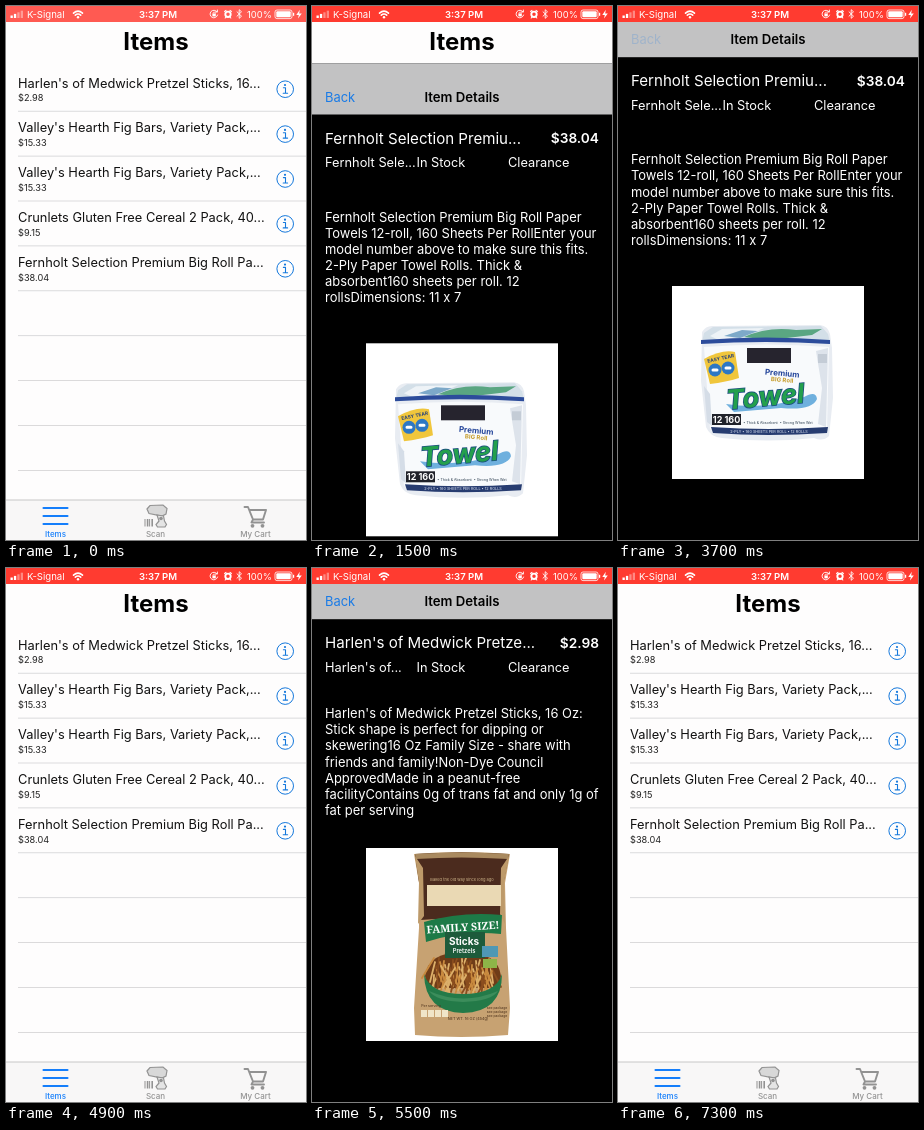
These frames come from a looping animation (300x534 px, 8 s). An HTML page:

```html
<!DOCTYPE html>
<html lang="en">
<head>
<meta charset="utf-8">
<title>Store items</title>
<style>
  html, body { margin: 0; width: 100%; height: 100%; overflow: hidden; background: #fefdfd; }
  svg { display: block; width: 100%; height: 100%; }
  text { font-family: Inter, "Liberation Sans", sans-serif; white-space: pre; }
  .line { fill: none; stroke-linecap: round; stroke-linejoin: round; }
</style>
</head>
<body>
<svg id="stage" viewBox="0 0 300 534"></svg>
<script>
const STEP = 100, LOOP = 8000, HEIGHT = 534;
const stage = document.getElementById('stage');

const text = (x, y, size, str, attrs = '') =>
  `<text x="${x}" y="${y}" font-size="${size}" ${attrs}>${str}</text>`;
const rect = (x, y, w, h, fill, attrs = '') =>
  `<rect x="${x}" y="${y}" width="${w}" height="${h}" fill="${fill}" ${attrs}/>`;
const path = (d, fill, attrs = '') => `<path d="${d}" fill="${fill}" ${attrs}/>`;
const line = (d, color, width = 1) =>
  `<path class="line" d="${d}" stroke="${color}" stroke-width="${width}"/>`;
const times = (n, make) => Array.from({ length: n }, (_, i) => make(i)).join('');
const MID = 'text-anchor="middle"';

// List screen
const items = [
  ["Harlen's of Medwick Pretzel Sticks, 16...", '$2.98'],
  ["Valley's Hearth Fig Bars, Variety Pack,...", '$15.33'],
  ["Valley's Hearth Fig Bars, Variety Pack,...", '$15.33'],
  ['Crunlets Gluten Free Cereal 2 Pack, 40...', '$9.15'],
  ['Fernholt Selection Premium Big Roll Pa...', '$38.04'],
];

const row = ([name, price], i) => `<g transform="translate(0 ${i * 44.9})">
  ${text(12, 81.5, 12.85, name, 'fill="#111"')}
  ${text(12, 95.3, 9.2, price, 'fill="#222"')}
  <circle cx="279.2" cy="83.2" r="8.3" fill="none" stroke="#1478dc"/>
  <circle cx="279" cy="79" r="1.1" fill="#1478dc"/>
  ${line('M277.4 81.8H279.5V87.2M277.2 87.2H281.6', '#1478dc', 1.1)}</g>`;

const gray = '#929292';
const tabs = rect(0, 494, 300, 40, '#f8f7f7') + rect(0, 493.6, 300, .8, '#b8b8ba') +
  line('M37.5 502H61.5M37.5 510H61.5M37.5 518H61.5', '#147efb', 2.1) +
  // barcode and hand scanner
  times(4, i => rect(138.5 + i * 2.3, 513, i % 2 ? 1.6 : 1, 7.5, gray)) +
  path('M141 503L144 499.5L157 499L161 502.5L160 508L156 510L143 507.5Z', '#d8d8d8',
    `stroke="${gray}" stroke-width="1.2"`) +
  path('M151 509L157.5 510L158.5 515L160.5 518.5L159 521H151.5L150 518.5L153 515Z', '#e4e4e4',
    `stroke="${gray}" stroke-width="1.2"`) +
  `<circle cx="155" cy="512.5" r="1.8" fill="${gray}"/>` +
  // cart
  line('M238.5 501H242L247 513.5H257L260 504H243.5M247 513.5L245.5 516.5H258', gray, 1.9) +
  `<circle cx="246.5" cy="519.8" r="1.9" fill="${gray}"/><circle cx="256.5" cy="519.8" r="1.9" fill="${gray}"/>` +
  text(49.5, 531, 8, 'Items', `${MID} fill="#147efb" font-weight="500"`) +
  text(149.5, 531, 8, 'Scan', `${MID} fill="${gray}" font-weight="500"`) +
  text(249.5, 531, 8, 'My Cart', `${MID} fill="${gray}" font-weight="500"`);

const list = rect(0, 0, 300, HEIGHT, '#fefdfd') +
  text(150, 44, 24, 'Items', `${MID} font-weight="700"`) +
  items.map(row).join('') +
  times(9, i => rect(12, 104.8 + i * 44.9, 288, .8, '#d2d2d4')) + tabs;

// Product pictures
const towels =
  path('M84 326Q88 319 96 320L202 319Q210 320 212 328L214 342L215 392L211 430Q205 436 196 432' +
    'Q150 437 104 432Q92 431 88 421L83 375Z', '#e8ecf2') +
  // top face
  path('M86 327L95 321L203 320L210 328L212 336H84Z', '#d3dfe8') +
  path('M92 330L104 323L146 322L130 329L101 334Z', '#eef3f7') +
  path('M126 331Q150 320 178 324L204 323L194 329L152 334Z', '#5aa682') +
  path('M106 330L124 324L140 325L122 332Z', '#7da9c9') +
  path('M83 334Q148 329 212 334V338Q148 334 83 338Z', '#2c4c9b') +
  // front face with soft folds
  path('M86 341Q148 336 211 341L209 424Q150 428 92 423Z', '#f8fafc') +
  path('M198 345L210 342L208 421L200 418L204 382Z', '#dde3eb') +
  path('M86 380L92 388L94 420L89 416Z', '#d5dde7') +
  rect(129, 342, 44, 15, '#26242e') +
  path('M86 353Q104 343 117 346L121 372Q108 376 92 378Z', '#f0c63c') +
  `<circle cx="97" cy="364" r="6.5" fill="#2d78c4"/><circle cx="110" cy="362" r="6.5" fill="#2d78c4"/>` +
  line('M95 364H99M108 362H112', '#fff', 3) +
  text(103, 354, 4.8, 'EASY TEAR', `${MID} fill="#24407c" font-weight="700" transform="rotate(-12 103 354)"`) +
  path('M108 398Q150 404 186 391Q198 384 199 393Q194 405 163 402L116 406Z', '#6fb0de') +
  text(164, 370, 8, 'Premium', `${MID} fill="#24459a" font-weight="700" transform="rotate(5 164 370)"`) +
  text(164, 376, 6, 'BIG Roll', `${MID} fill="#c59b28" font-weight="700" transform="rotate(5 164 376)"`) +
  text(148, 400, 27, 'Towel', `${MID} fill="#23a04d" font-weight="700" font-style="italic"
    stroke="#1c4c80" stroke-width="1.6" paint-order="stroke" transform="rotate(-5 148 398)"`) +
  rect(94, 408, 29, 11, '#20222a') +
  text(108.5, 417, 9, '12 160', `${MID} fill="#fff" font-weight="700"`) +
  text(160, 418, 3.6, '• Thick &amp; Absorbent  • Strong When Wet', `${MID} fill="#345"`) +
  path('M93 421Q150 425 210 421L209 427Q150 431 95 427Z', '#273c70') +
  text(151, 427, 3.8, '2-PLY • 160 SHEETS PER ROLL • 12 ROLLS', `${MID} fill="#dfe6f4"`) +
  rect(200, 348, 9, 9, '#c4ccd6');

const sticks = () => {
  const strand = i => {
    const x = 122 + (i * 37 % 59), y = 390 + (i * 23 % 20), lean = (i * 29 % 25) - 12;
    return line(`M${x} ${y}l${lean} 20`, ['#c98a3f', '#8a4d1e', '#ddb06a'][i % 3], 1.8);
  };
  return path('M102 286Q149 282 198 286L193 315L194 360L198 440L196 467Q149 471 103 467L102 440L107 360V315Z', '#c7a272') +
    // dark upper panel
    path('M103 286Q149 283 197 286L192 312V347L108 352L107 314Z', '#4b2b1e') +
    path('M103 286Q149 283 197 286L196 291Q149 288 104 291Z', '#a98a60') +
    path('M103 288L111 300L112 348L106 356L107 314Z', '#bd9a6a') +
    path('M197 288L189 300L188 346L193 356L192 314Z', '#bd9a6a') +
    text(150, 313, 4, 'Baked the old way since long ago', `${MID} fill="#cdb48a"`) +
    rect(115, 317, 74, 21, '#ead9b4') +
    path('M112 354Q150 343 190 347L189 366Q150 362 114 374Z', '#1d7a47') +
    text(151, 363, 10.6, 'FAMILY SIZE!', `${MID} fill="#fff" font-weight="700"
      style="font-family:'Noto Serif',serif" transform="rotate(-4 151 360)"`) +
    path('M113 408Q116 384 151 384Q186 384 189 408L187 420H116Z', '#6f3c18') + times(60, strand) +
    path('M112 406Q118 426 151 426Q184 426 190 406Q190 444 151 445Q113 444 112 406Z', '#237a48') +
    path('M117 423Q151 438 186 423Q180 433 151 434Q124 433 117 423Z', '#3c8d5b') +
    rect(133, 364, 40, 26, '#1d5b3b') +
    text(152, 377, 10, 'Sticks', `${MID} fill="#fff" font-weight="700"`) +
    text(152, 384.5, 5.8, 'Pretzels', `${MID} fill="#fff" font-weight="600"`) +
    rect(170, 378, 16, 11, '#4f98b5') + rect(171, 391, 14, 9, '#8db548') +
    times(4, i => rect(109 + i * 7, 442, 6, 7, '#f0e5c8')) +
    text(119, 438.5, 3.6, 'Per serving', `${MID} fill="#4b301b"`) +
    text(156, 452, 3.8, 'NET WT. 16 OZ (454g)', `${MID} fill="#4b301b"`) +
    times(3, i => text(185, 441 + i * 4, 3.4, 'see package', `${MID} fill="#4b301b"`));
};

// Detail sheets, each with its opening and closing time
const sheets = [
  { open: 1300, close: 3700, title: 'Fernholt Selection Premiu...', brand: 'Fernholt Sele...', price: '$38.04',
    picture: towels, about: [
      'Fernholt Selection Premium Big Roll Paper',
      'Towels 12-roll, 160 Sheets Per RollEnter your',
      'model number above to make sure this fits.',
      '2-Ply Paper Towel Rolls. Thick &amp;',
      'absorbent160 sheets per roll. 12',
      'rollsDimensions: 11 x 7'] },
  { open: 4900, close: 6700, title: "Harlen's of Medwick Pretze...", brand: "Harlen's of...", price: '$2.98',
    picture: sticks(), about: [
      "Harlen's of Medwick Pretzel Sticks, 16 Oz:",
      'Stick shape is perfect for dipping or',
      'skewering16 Oz Family Size - share with',
      'friends and family!Non-Dye Council',
      'ApprovedMade in a peanut-free',
      'facilityContains 0g of trans fat and only 1g of',
      'fat per serving'] },
];

const sheet = ({ title, brand, price, picture, about }) => `<g class="sheet">
  ${rect(0, 0, 300, HEIGHT + 1, '#000')}${rect(0, 0, 300, 51.2, '#c2c2c3')}
  ${text(13, 38.4, 12.9, 'Back', 'class="back" fill="#1a7be6"')}
  ${text(150, 38.4, 13.2, 'Item Details', `${MID} font-weight="600"`)}
  <g fill="#fff">${text(13, 80.3, 15.1, title)}
  ${text(287, 80, 13.7, price, 'text-anchor="end" font-weight="600"')}
  ${text(13, 104, 12.8, brand)}${text(104.5, 104, 12.8, 'In Stock')}${text(196, 104, 12.8, 'Clearance')}
  ${about.map((s, i) => text(13, 198.6 + (i - (about.length - 1) / 2) * 16.15, 12.95, s)).join('')}</g>
  ${rect(54, 280, 192, 193, '#fff')}${picture}</g>`;

// Status bar
const status = rect(0, 0, 300, 16, '#ff3b30', 'id="bar"') + '<g fill="#fff">' +
  times(4, i => rect(4.5 + i * 3.4, 9.5 - i * 1.6, 2.3, 2.5 + i * 1.6, '#fff', i > 1 ? 'opacity=".4"' : '')) +
  text(21, 12.2, 9.6, 'K-Signal') +
  line('M67.5 7.2Q72 3 76.5 7.2M69.3 9.2Q72 6.8 74.7 9.2', '#fff', 1.6) +
  '<circle cx="72" cy="11.3" r="1.2"/>' +
  text(152, 12.2, 9.6, '3:37 PM', `${MID} font-weight="600"`) +
  line('M211 5.8A3.8 3.8 0 1 0 211.6 9M211.4 4V6H209.4', '#fff', .9) + rect(206.4, 7.6, 3.4, 2.8, '#fff') +
  line('M207.1 7.5V6.6Q208.1 5.3 209.1 6.6V7.5', '#fff', .7) +
  '<circle cx="222" cy="8.3" r="2.7" fill="none" stroke="#fff" stroke-width="1.9"/>' +
  line('M218.6 5.5L220 4.3M225.4 5.5L224 4.3M220 11L219.2 12M224 11L224.8 12', '#fff', 1.1) +
  line('M231 5.8L235.5 10.2L233.2 12.3V3.7L235.5 5.8L231 10.2', '#fff', .9) +
  text(241, 12.2, 9.4, '100%') +
  '<rect x="269" y="4" width="17" height="8.6" rx="2" fill="none" stroke="#fff" stroke-width=".8"/>' +
  rect(270.3, 5.3, 14.4, 6, '#fff', 'rx="1"') + rect(287, 6.8, 1.2, 3, '#fff') +
  path('M293.8 3.8L290.3 9H292.8L292 12.6L295.8 7.4H293.2Z', '#fff') + '</g>';

stage.innerHTML = list + sheets.map(sheet).join('') + status;
const bar = document.getElementById('bar');
const layers = [...stage.querySelectorAll('.sheet')];
const backs = [...stage.querySelectorAll('.back')];

// Critically damped spring: share of the way still to go
const remaining = ms => {
  if (ms <= 0) return 1;
  const k = .019 * ms;
  return ms >= 600 ? 0 : (1 + k) * Math.exp(-k);
};

function draw(now) {
  const t = Math.floor(now % LOOP / STEP) * STEP;
  bar.setAttribute('fill', t < 100 ? '#ff5a52' : '#ff3b30');
  sheets.forEach(({ open, close }, i) => {
    const away = t < close ? remaining(t - open) : 1 - remaining(t - close);
    layers[i].setAttribute('transform', `translate(0 ${(away * HEIGHT).toFixed(1)})`);
    layers[i].setAttribute('visibility', away < 1 ? 'visible' : 'hidden');
    backs[i].setAttribute('opacity', t < close ? 1 : Math.min(1, .2 + (t - close) / 400));
  });
  requestAnimationFrame(() => draw(performance.now() - start));
}
const start = performance.now();
draw(0);
</script>
</body>
</html>
```
